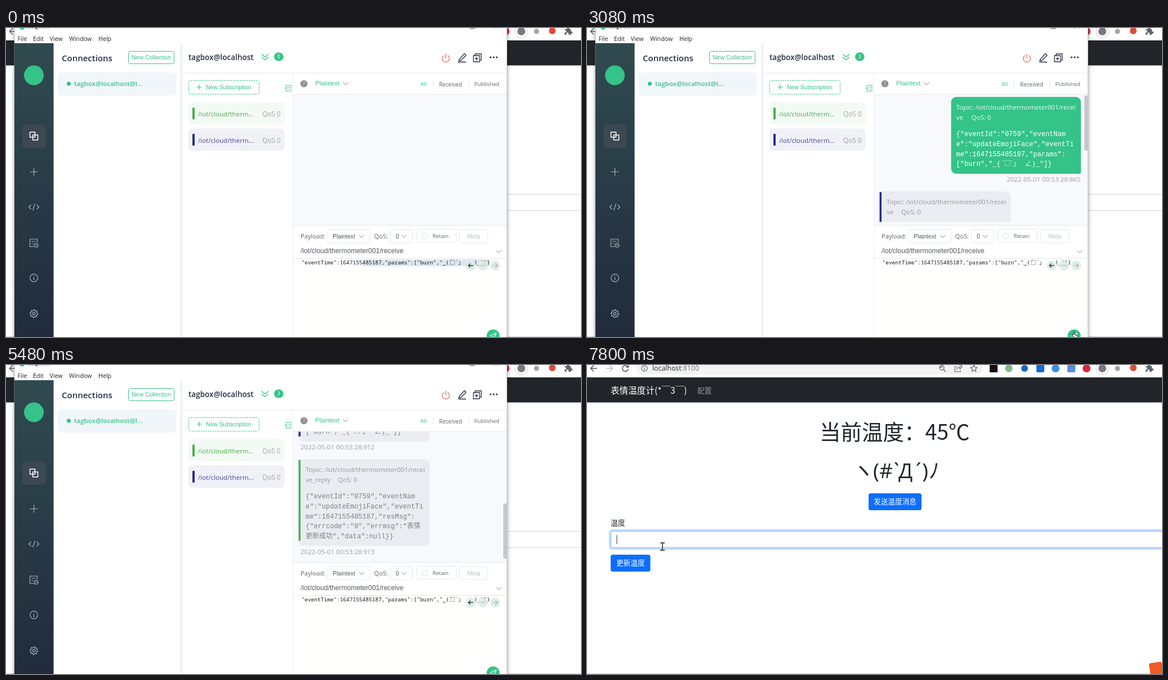
Write an HTML page with a canvas that moves like this. It is 1021 px wide and 549 px high and loops after 8 s.

```html
<!DOCTYPE html>
<html lang="en">
<head>
<meta charset="utf-8">
<title>Thermometer console</title>
<style>
html, body { margin: 0; width: 100%; height: 100%; overflow: hidden; background: #fff; }
canvas { display: block; width: 1021px; height: 549px; }
</style>
</head>
<body>
<canvas id="stage" width="1021" height="549"></canvas>
<script>
const ctx = document.getElementById('stage').getContext('2d');
const LOOP = 8000;
const UI = "'Open Sans', 'Noto Sans', sans-serif";
const ARIAL = "'Liberation Sans', Arial, sans-serif";
const CJK = "'Noto Sans CJK SC', 'Noto Sans CJK', sans-serif";
const MONO = "'Liberation Mono', 'Noto Sans Mono CJK SC', 'Noto Sans CJK SC', monospace";
const EDIT = "'Noto Sans Mono', 'DejaVu Sans Mono', monospace";
const GREEN = '#34c388', NAVY = '#282c8d', LEAF = '#46b04c', INK = '#262e41', GREY = '#9a9da4', LINE = '#e4e7ed';

// y is the middle of the capitals
function text(str, x, y, size, color, font = UI, weight = 400, align = 'left') {
  ctx.font = `${weight} ${size}px ${font}`;
  ctx.fillStyle = color;
  ctx.textAlign = align;
  ctx.fillText(str, x, y + size * 0.355);
}
function rect(x, y, w, h, color) {
  ctx.fillStyle = color;
  ctx.fillRect(x, y, w, h);
}
function box(x, y, w, h, r, fill, stroke, width = 1) {
  ctx.beginPath();
  ctx.roundRect(x, y, w, h, r);
  if (fill) { ctx.fillStyle = fill; ctx.fill(); }
  if (stroke) { ctx.strokeStyle = stroke; ctx.lineWidth = width; ctx.stroke(); }
}
function disc(x, y, r, fill, stroke, width = 1) {
  ctx.beginPath();
  ctx.arc(x, y, r, 0, Math.PI * 2);
  if (fill) { ctx.fillStyle = fill; ctx.fill(); }
  if (stroke) { ctx.strokeStyle = stroke; ctx.lineWidth = width; ctx.stroke(); }
}
function path(d, x, y, stroke, width = 1.2, fill) {
  const p = new Path2D(d);
  ctx.save();
  ctx.translate(x, y);
  if (fill) { ctx.fillStyle = fill; ctx.fill(p); }
  if (stroke) {
    ctx.strokeStyle = stroke;
    ctx.lineWidth = width;
    ctx.lineJoin = 'round';
    ctx.stroke(p);
  }
  ctx.restore();
}
const chevron = (x, y, color = '#a9adb5') => path('M-4.5-2.2L0 2.3L4.5-2.2', x, y, color);

// ---- browser page ----
function drawToolbar() {
  rect(0, 0, 1021, 22, '#fff');
  box(87, -9, 616, 26, 13, '#f1f3f4');
  path('M6 0H-5M0-5.5L-5.5 0L0 5.5', 12, 6, '#50545a', 1.5);
  path('M-6 0H5M0-5.5L5.5 0L0 5.5', 40, 6, '#b9bcc0', 1.5);
  path('M4.6-2.5A5.2 5.2 0 1 0 5.2 1M5.4-6V-2H1.4', 68, 6, '#50545a', 1.5);
  disc(102, 6, 5.2, null, '#5f6368', 1.2);
  path('M0-.8V3M0-3V-1.8', 102, 6, '#5f6368', 1.3);
  text('localhost', 116, 6, 12.3, '#24272b');
  ctx.font = `400 12.3px ${UI}`;
  text(':8100', 116 + ctx.measureText('localhost').width, 6, 12.3, '#74787d');
  disc(630, 5, 4, null, '#5f6368', 1.3);
  path('M3 3L7 7M-3-1H1', 630, 5, '#5f6368', 1.3);
  path('M-2-3H-6V6H4V3M-3 3Q-2-2 3-2V1L7-3L3-7V-4', 659, 6, '#5f6368', 1.1);
  path('M0-6L1.7-2L6-1.6L2.7 1.2L3.7 5.5L0 3.2L-3.7 5.5L-2.7 1.2L-6-1.6L-1.7-2Z', 687, 6, '#5f6368', 1.2);
  rect(715, -1, 14, 14, '#111');
  disc(749, 6, 6.7, '#84b98b');
  disc(777, 6, 6, '#1767c1');
  box(798, -1, 14, 14, 2, '#176ad6');
  disc(832, 6, 7, '#3a91df');
  box(853, -1, 14, 14, 2, '#5b8bdd');
  disc(887, 6, 7, '#d9243b');
  ctx.save();
  ctx.shadowColor = 'rgba(0,0,0,.3)';
  ctx.shadowBlur = 4;
  disc(915, 6, 10, '#fff');
  ctx.restore();
  disc(915, 6, 7, '#77777d');
  disc(942, 6, 4.5, '#a3a3a3');
  disc(970, 5, 6, '#e04a36');
  path('M-6-3H-2V-5A2 2 0 0 1 2-5V-3H5V1H6A2 2 0 0 1 6 5H5V7H1V5A2 2 0 0 0-3 5V7H-6V3H-5A2 2 0 0 0-5-1H-6Z', 998, 5, null, 1, '#5f6368');
}
function blueButton(label, x, y, w) {
  box(x, y, w, 30, 3.5, '#0d6efd');
  text(label, x + w / 2, y + 15, 12.65, '#fff', CJK, 400, 'center');
}
function drawPage(t) {
  rect(0, 0, 1021, 549, '#fff');
  drawToolbar();
  rect(0, 22, 1021, 44.5, '#212529');
  text('表情温度计(*￣3￣)', 42, 45, 15.6, '#fff', CJK);
  text('配置', 196, 45, 12.8, '#95979a', CJK);
  text('当前温度：45℃', 413, 120, 37.5, '#212529', CJK);
  text('ヽ', 472, 188, 37.5, '#212529', CJK);
  [['(', 508], ['#', 519], ['`', 539], ['Д', 553], ['´', 578], [')', 595]]
    .forEach(([s, x]) => text(s, x, 188, 37, '#212529'));
  text('ﾉ', 607, 188, 37.5, '#212529', CJK);
  blueButton('发送温度消息', 500, 228, 94);
  text('温度', 42, 280, 12.8, '#212529', CJK);
  const focus = Math.min(1, Math.max(0, (t - 7600) / 150));
  if (focus) box(40.5, 293.5, 1010, 33, 5, null, `rgba(194,219,254,${focus})`, 3.4);
  box(42.5, 295.5, 1006, 29, 3.5, '#fff', focus > 0.5 ? '#86b7fe' : '#ced4da');
  if (t >= 7720) rect(52.5, 302, 1, 16, '#333');
  blueButton('更新温度', 42, 337, 70.5);
  rect(0, 548, 1021, 1, '#c9c9c9');
}

// ---- desktop client ----
function drawSidebar() {
  const g = ctx.createLinearGradient(0, 27, 0, 549);
  g.addColorStop(0, '#304b50');
  g.addColorStop(1, '#212b3c');
  rect(15, 27, 69.5, 522, g);
  disc(49.5, 84, 17.5, GREEN);
  box(29, 171.5, 41.5, 41.5, 5, '#3c4852');
  const c = '#a9b2b6';
  path('M-7-7H2V2H-7ZM-2-2H7V7H-2Z', 49.5, 192, '#fff', 1.5);
  path('M-7 0H7M0-7V7', 49.5, 255.5, c);
  path('M-5-4L-9 0L-5 4M5-4L9 0L5 4M2-6L-2 6', 49.5, 318, c);
  path('M0 6.5H-7V-7H6V-1M-4-3H3M-4 1H-1', 49.5, 382, c);
  disc(53.5, 386, 3.5, null, c, 1.2);
  path('M3.5 2V4.5H6', 49.5, 382, c, 1);
  disc(49.5, 444, 6.8, null, c, 1.2);
  path('M0-1V4M0-4V-2.5', 49.5, 444, c, 1.3);
  ctx.beginPath();
  for (let i = 0; i < 32; i++) {
    const a = i * Math.PI / 16, r = i % 4 < 2 ? 7 : 5.4;
    ctx.lineTo(49.5 + r * Math.cos(a), 507.5 + r * Math.sin(a));
  }
  ctx.closePath();
  ctx.strokeStyle = c;
  ctx.lineWidth = 1.2;
  ctx.stroke();
  disc(49.5, 507.5, 2.3, null, c, 1.2);
}
function subscription(y, bg, bar, color) {
  box(324, y, 170.5, 39.5, 6, bg);
  box(331, y + 9.5, 4, 21, 1, bar);
  text('/iot/cloud/therm...', 341, y + 21, 11.6, color);
  text('QoS 0', 455, y + 21, 11.8, '#a3a6ab');
}
function drawPanels(count) {
  text('Connections', 99, 54, 15, INK, UI, 600);
  box(217.5, 41.5, 81, 22, 3, '#fff', GREEN);
  text('New Collection', 223, 52.5, 10.5, GREEN, ARIAL);
  box(92, 79, 210, 41, 6, '#f1f6fa');
  disc(111.5, 99, 3.6, GREEN);
  text('tagbox@localhost@l...', 121, 98.5, 11.5, GREEN, UI, 600);
  const g = ctx.createLinearGradient(309, 0, 316, 0);
  g.addColorStop(0, '#e8ecf1');
  g.addColorStop(1, '#fff');
  rect(309.5, 27, 6, 522, g);

  text('tagbox@localhost', 324, 52, 13.5, INK, UI, 600);
  path('M-6-5L0 0L6-5M-6 0L0 5L6 0', 460, 51.5, GREEN, 1.4);
  box(476, 43.5, 16.5, 15, 7.5, GREEN);
  text(count, 484.2, 51, 9.5, '#fff', UI, 400, 'center');
  path('M-3.5-5.2A6.4 6.4 0 1 0 3.5-5.2M0-8V0', 781, 54, '#ec6f60', 1.4);
  path('M-5 3L4-7L7-4L-2 5L-6 6ZM-7 8H7', 810, 52.5, INK, 1.3);
  path('M-4-3V-7H7V4H4M-7-4H4V7H-7ZM-1.5-1.5V4.5M-4.5 1.5H1.5', 837, 53, INK, 1.3);
  [860.5, 866, 871.5].forEach(x => disc(x, 52, 1.6, INK));
  rect(314, 79.5, 575, 1, LINE);
  rect(509, 80, 1, 469, '#eceef3');

  ctx.setLineDash([2.5, 1.5]);
  box(324.5, 93.5, 125, 24, 3, '#fff', GREEN);
  ctx.setLineDash([]);
  path('M-4.5 0H4.5M0-4.5V4.5', 343, 105, GREEN);
  text('New Subscription', 355, 105.5, 10.4, GREEN, ARIAL);
  path('M-6-5H6M0-1.7H6M0 1.7H6M-6 5H6M-2-2.5L-5.5 0L-2 2.5', 501.5, 107, GREEN, 1.1);
  subscription(132, '#f3faf4', LEAF, '#4aa951');
  subscription(178.5, '#f0f0f7', NAVY, '#42469b');

  disc(529, 99, 6.3, '#8f9196');
  text('?', 529, 99, 8.5, '#e8e8e8', UI, 400, 'center');
  text('Plaintext', 549, 98, 11.2, GREEN, ARIAL);
  chevron(603, 98.5);
  text('All', 736, 100, 9.8, GREEN);
  text('Received', 769, 100, 9.9, '#606368');
  text('Published', 831.5, 100, 9.7, '#606368');
  rect(758, 93, 1, 13, LINE);
  rect(821, 93, 1, 13, LINE);
}

// ---- message list ----
const HEAD = ['{"eventId":"0759","eventNam', 'e":"updateEmojiFace","eventTi'];
const BURN = [...HEAD, 'me":1647155485187,"params":', null];
const REPLY = [...HEAD, 'me":1647155485187,"resMsg":', '{"errcode":"0","errmsg":"表情', '更新成功","data":null}}'];
const MESSAGES = [
  { y: 122.5, h: 136.5, tail: 've', qos: 27, lines: BURN, time: '865', own: true },
  { y: 290.5, h: 136.5, tail: 've', qos: 26, lines: BURN, time: '912', bar: NAVY },
  { y: 458.5, h: 154, tail: 've_reply', qos: 57, lines: REPLY, time: '913', bar: LEAF }
];
function faceLine(x, y, color) {
  text('["burn","_(´', x, y, 12, color, MONO);
  text('□', x + 85, y, 12, color, CJK);
  text('`', x + 95, y, 12, color, MONO);
  text('」', x + 101, y, 12, color, CJK);
  text('∠', x + 122, y, 12, color, CJK);
  text(')_"]}', x + 134, y, 12, color, MONO);
}
function message(m) {
  const x = m.own ? 655.5 : 532, head = m.own ? '#f0fbf6' : '#94979d', code = m.own ? '#fff' : '#7d8087';
  if (m.own) box(646.5, m.y, 230.5, m.h, [9, 9, 2, 9], GREEN);
  else {
    box(520, m.y, 232.5, m.h, [1, 9, 9, 9], '#ebecf1');
    rect(519.5, m.y + 1, 3.5, m.h - 10, m.bar);
  }
  text('Topic: /iot/cloud/thermometer001/recei', x, m.y + 18.5, 11.5, head);
  text(m.tail, x, m.y + 36, 11.5, head);
  text('QoS: 0', x + m.qos, m.y + 36, 11.5, head);
  m.lines.forEach((s, i) => {
    const y = m.y + 65 + i * 17.9;
    if (s) text(s, x, y, 12, code, MONO);
    else faceLine(x, y, code);
  });
  text('2022-05-01 00:53:28:' + m.time, m.own ? 876.5 : 523, m.y + m.h + 10, 11.5, GREY, UI, 400, m.own ? 'right' : 'left');
}
function drawMessages(count, scroll) {
  rect(510, 118, 379, 232, '#f8f9fd');
  rect(510, 117.5, 379, 1, LINE);
  ctx.save();
  ctx.beginPath();
  ctx.rect(510, 118.5, 379, 226 + 6 * scroll);
  ctx.clip();
  ctx.translate(0, -291 * scroll);
  MESSAGES.slice(0, count).forEach(message);
  ctx.restore();
  if (count > 2) box(883, 120 + 126 * scroll, 6.5, 98, 3, '#c7c8cc');
  rect(510, 350, 379, 1, LINE);
}

function drawComposer(selected) {
  text('Payload:', 523, 370, 11.2, '#606368');
  box(570.5, 358.5, 75.5, 23, 3, '#fff', LINE);
  text('Plaintext', 580, 370, 10.4, '#55585e', ARIAL);
  chevron(631.5, 370);
  text('QoS:', 653.5, 370, 11.2, '#606368');
  box(682.5, 358.5, 39, 23, 3, '#fff', LINE);
  text('0', 692, 370, 10.5, '#55585e', ARIAL);
  chevron(707, 370);
  box(729.5, 357.5, 70, 23, 3, '#fff', LINE);
  disc(743.5, 370, 5, '#fff', '#dfe2e8');
  text('Retain', 757.5, 370, 9.6, '#606368');
  box(805.5, 358.5, 50, 23, 3, '#fff', LINE);
  text('Meta', 819, 370, 10.4, '#bcc0c8', ARIAL);
  text('/iot/cloud/thermometer001/receive', 523, 396, 12.1, '#55585e', ARIAL);
  chevron(875, 397);
  rect(510, 409, 379, 1, LINE);
  rect(510, 410, 379, 139, '#fffffd');
  if (selected) rect(633, 411, 226.5, 12.5, '#e2e6f1');
  text('"eventTime":1647155485187,"params":["burn","_(´', 524.5, 417, 9.5, '#16181c', EDIT);
  text('□', 788, 417, 9.5, '#16181c', CJK);
  text('`', 798, 417, 9.5, '#16181c', EDIT);
  text('」', 803, 417, 9.5, '#16181c', CJK);
  text(')_"]}', 831, 417, 9.5, '#16181c', EDIT);
  [825, 847, 868.5].forEach(x => disc(x, 422, 8.8, 'rgba(220,236,228,.88)'));
  path('M4.5 0H-4M-.5-3.5L-4 0L-.5 3.5', 825, 422, '#2c3539', 1.3);
  path('M-4 0H4', 847, 422, '#aebbb5', 1.2);
  path('M-4.5 0H4M.5-3.5L4 0L.5 3.5', 868.5, 422, '#a5b3ad', 1.2);
  disc(865, 547, 11.5, GREEN);
  path('M-5.5 0L5.5-5L2.5 5L-1 2.5V6L-2.3 1.5ZM-1 2.5L5.5-5', 865, 546.5, '#fff', 1);
}

function drawClient(t) {
  const count = t < 2760 ? 0 : t < 2840 ? 1 : 3;
  const k = Math.min(1, Math.max(0, (t - 3270) / 250));
  ctx.save();
  ctx.shadowColor = 'rgba(0,0,0,.4)';
  ctx.shadowBlur = 7;
  rect(15, -10, 874.5, 570, '#fff');
  ctx.restore();
  rect(14.5, 0, 0.7, 549, '#9fa3a6');
  rect(889, 0, 0.7, 549, '#b0b3b6');
  disc(28.5, -2, 4.8, GREEN);
  text('MQTTX', 39, -2.8, 11, '#222');
  path('M-4-8H4V0H-4Z', 828, 1, '#555', 1);
  path('M-4-8L4 0M4-8L-4 0', 870, 1, '#555', 1);
  [['File', 20.5], ['Edit', 48], ['View', 77.5], ['Window', 112], ['Help', 164]]
    .forEach(([s, x]) => text(s, x, 19.5, 10.7, '#222'));
  drawSidebar();
  drawPanels(count);
  drawMessages(count, k * k * (3 - 2 * k));
  drawComposer(t < 1200);
}

// ---- pointer: [time, x, y] ----
const TRACKS = [
  [[560, 1018, 470], [800, 880, 442], [1080, 765, 425], [1280, 743, 420], [1440, 743, 420], [1620, 754, 436],
   [1860, 806, 495], [2080, 855, 540], [2150, 855, 540], [2240, 866, 546], [3160, 866, 546], [3340, 845, 360],
   [3540, 833.5, 327.5], [3640, 833.5, 327.5], [3840, 800, 240], [4040, 720, 219], [4240, 645, 252],
   [4400, 614, 284], [4560, 614, 284], [4800, 607, 290], [5080, 607, 290], [5220, 700, 272], [5360, 870, 260],
   [5470, 1024, 266]],
  [[6280, 931, 251], [6440, 770, 276], [6640, 420, 332], [6780, 240, 345], [6870, 177.5, 330.5],
   [6960, 177.5, 330.5], [7040, 139, 342], [7140, 128, 350], [7240, 124, 352], [7360, 129, 337], [7480, 134, 322.5],
   [8000, 134, 322.5]]
];
function pointerAt(t) {
  const track = TRACKS.find(p => t >= p[0][0] && t < p[p.length - 1][0]);
  if (!track) return null;
  const i = track.findIndex(p => p[0] > t), a = track[i - 1], b = track[i];
  const k = (t - a[0]) / (b[0] - a[0]);
  return [a[1] + (b[1] - a[1]) * k, a[2] + (b[2] - a[2]) * k];
}
function pointerKind(t, x, y) {
  if (t > 5960) return x > 42 && y > 295 && y < 325 ? 'beam' : 'arrow';
  if (t >= 2400 && Math.hypot(x - 865, y - 547) < 11) return 'hand';
  if (x < 885 && y > 410) return 'beam';
  return t > 3560 && x > 530 && x < 745 && y > 175 && y < 312 ? 'beam' : 'arrow';
}
function drawPointer(t) {
  const p = pointerAt(t);
  if (!p) return;
  const [x, y] = p, kind = pointerKind(t, x, y);
  if (kind === 'beam') {
    const d = 'M-4-6.5H-1L0-5.5L1-6.5H4M0-5.5V5.5M-4 6.5H-1L0 5.5L1 6.5H4';
    path(d, x, y, '#fff', 2.6);
    path(d, x, y, '#111', 1.4);
  } else if (kind === 'hand') {
    path('M-2 7V2L-5 0V-1.5L-2-1V-5.5H0V-1L5 .5V7Z', x, y, '#222', 1, '#fff');
  } else {
    path('M.5 .5V13.5L3.5 10.8L5.7 15.6L8 14.6L5.9 9.9H10Z', x, y, '#222', 1, '#fff');
  }
}

function inputBadge() {
  ctx.save();
  ctx.translate(1010, 539);
  ctx.rotate(-0.15);
  box(-11, -10.5, 23, 23, 3, '#f25a22');
  ctx.restore();
}

function frame(now) {
  const t = now % LOOP;
  drawPage(t);
  if (t < 5960) drawClient(t);
  if ((t >= 1200 && t < 2840) || t >= 7720) inputBadge();
  drawPointer(t);
  requestAnimationFrame(frame);
}
const start = performance.now();
requestAnimationFrame(function tick() {
  frame0();
});
function frame0() {
  const loop = () => {
    const t = (performance.now() - start) % LOOP;
    render(t);
    requestAnimationFrame(loop);
  };
  loop();
}
function render(t) {
  drawPage(t);
  if (t < 5960) drawClient(t);
  if ((t >= 1200 && t < 2840) || t >= 7720) inputBadge();
  drawPointer(t);
}
</script>
</body>
</html>
```
